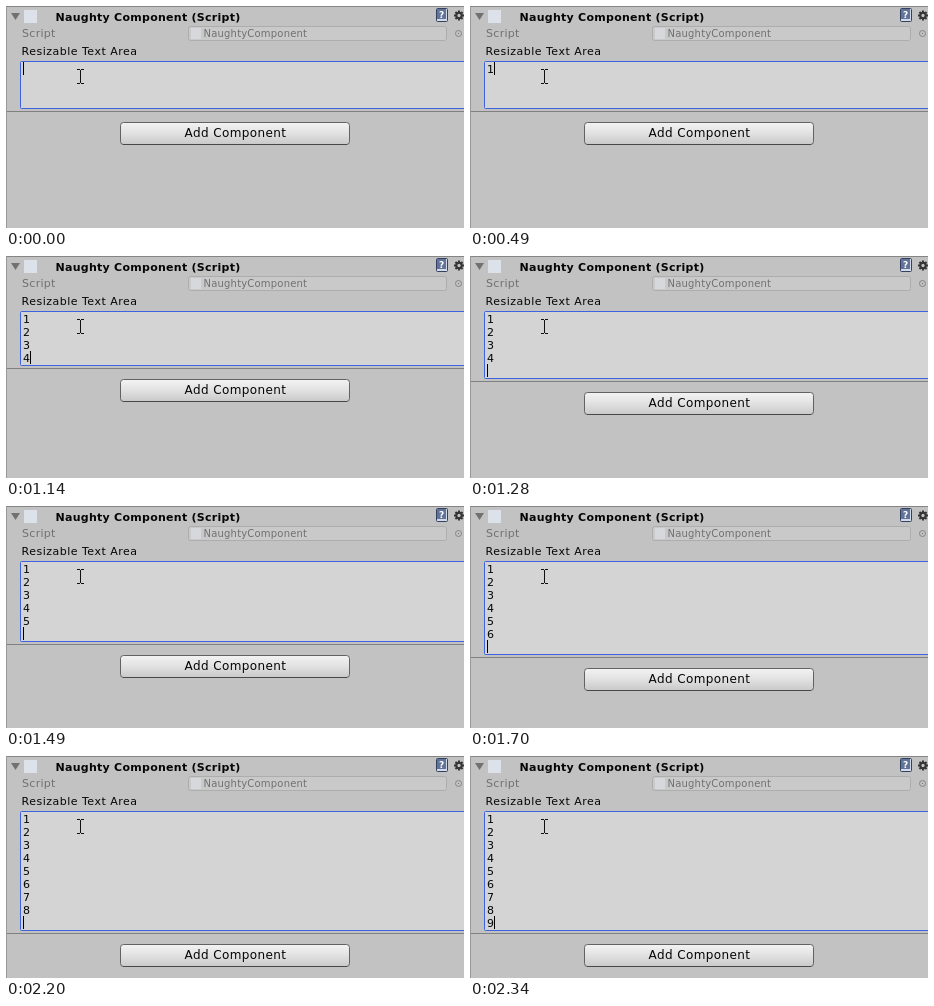
An HTML page with a canvas for the animation above (2520 ms loop, 458x222 px).

```html
<!DOCTYPE html>
<html lang="en">
<head>
<meta charset="utf-8">
<title>Resizable text area</title>
<style>
html, body { margin: 0; width: 100%; height: 100%; overflow: hidden; background: #c2c2c2; }
canvas { display: block; width: 458px; height: 222px; }
</style>
</head>
<body>
<canvas id="stage" width="458" height="222"></canvas>
<script>
const ctx = document.getElementById('stage').getContext('2d');
const W = 458, H = 222, LOOP = 2520;
const LINE = 13, AREA_TOP = 55, MIN_BOTTOM = 103;

// Each key press alternates between a digit and a line break.
const KEYS = [490, 590, 690, 790, 890, 1030, 1140, 1280, 1350,
              1490, 1560, 1700, 1810, 1950, 2060, 2200, 2340];

function rect(x, y, w, h, color) {
  ctx.fillStyle = color;
  ctx.fillRect(x, y, w, h);
}

function text(str, x, y, size, color, spacing = 0, weight = 'normal') {
  ctx.font = `${weight} ${size}px "DejaVu Sans", sans-serif`;
  ctx.letterSpacing = spacing + 'px';
  ctx.fillStyle = color;
  ctx.fillText(str, x, y);
}

function roundBox(x, y, w, h, r, fill, stroke) {
  ctx.beginPath();
  ctx.roundRect(x, y, w, h, r);
  ctx.fillStyle = fill;
  ctx.fill();
  ctx.strokeStyle = stroke;
  ctx.lineWidth = 1;
  ctx.stroke();
}

function ring(x, y, r, color, width) {
  ctx.beginPath();
  ctx.arc(x, y, r, 0, Math.PI * 2);
  ctx.strokeStyle = color;
  ctx.lineWidth = width;
  ctx.stroke();
}

function gear(x, y) {
  ctx.save();
  ctx.translate(x, y);
  for (let i = 0; i < 8; i++) {
    rect(-1, -5, 2, 3, '#363636');
    ctx.rotate(Math.PI / 4);
  }
  ring(0, 0, 2.7, '#363636', 2);
  ctx.restore();
}

function helpBook() {
  roundBox(430.5, 2.5, 11, 13, 1, '#d3dae8', '#33415f');
  rect(431, 3, 9, 10, '#627399');
  text('?', 433, 12, 9, '#ffffff', 0, 'bold');
}

function header() {
  rect(0, 0, W, 1, '#858585');
  rect(0, 0, 1, H, '#989898');
  ctx.beginPath();
  ctx.moveTo(5, 7);
  ctx.lineTo(14, 7);
  ctx.lineTo(9.5, 14);
  ctx.fillStyle = '#717171';
  ctx.fill();
  rect(18, 4, 13, 13, '#dce1ea');
  text('Naughty Component (Script)', 49.5, 15, 11, '#050505', 0.27, 'bold');
  helpBook();
  gear(453, 9.5);
}

function scriptField() {
  text('Script', 16, 31, 11, '#707070', 0.3);
  roundBox(182.5, 20.5, 258, 14, 2, '#c9c9c9', '#adadad');
  rect(185, 22, 10, 11, '#d6d8dc');
  text('NaughtyComponent', 197.5, 31, 10, '#707070', 0.2);
  ring(452.5, 27.5, 3, '#858585', 1);
  rect(452, 27, 1, 1, '#707070');
}

function textArea(count, bottom) {
  text('Resizable Text Area', 15.5, 49, 11, '#050505', 0.5);
  roundBox(14.5, AREA_TOP + 0.5, W, bottom - AREA_TOP - 1, 1, '#d4d4d4', '#3f62e0');
  const digits = Math.ceil(count / 2);
  for (let i = 0; i < digits; i++)
    text(String(i + 1), 17, 67 + i * LINE, 11, '#050505');
  const row = Math.floor(count / 2);
  rect(count % 2 ? 24 : 17, 56 + row * LINE, 1, 13, '#000000');
}

function button(y) {
  const g = ctx.createLinearGradient(0, y, 0, y + 22);
  g.addColorStop(0, '#f4f4f4');
  g.addColorStop(0.5, '#e2e2e2');
  g.addColorStop(1, '#cacaca');
  roundBox(114.5, y + 0.5, 229, 22, 3, g, '#626262');
  rect(117, y + 22, 224, 1, '#484848');
  text('Add Component', 178.5, y + 15, 12, '#050505', 0.4);
}

function pointer() {
  rect(74, 64, 1, 13, '#101010');
  for (const y of [63, 77]) {
    rect(71, y, 3, 1, '#101010');
    rect(75, y, 3, 1, '#101010');
  }
}

function draw(t) {
  const count = KEYS.filter(k => k <= t).length;
  const lines = Math.floor(count / 2) + 1;
  const bottom = Math.max(MIN_BOTTOM, 58 + lines * LINE);
  rect(0, 0, W, H, '#c2c2c2');
  header();
  scriptField();
  textArea(count, bottom);
  rect(1, bottom + 2, W - 1, 1, '#808080');
  button(bottom + 13);
  pointer();
}

const start = performance.now();
function tick() {
  draw((performance.now() - start) % LOOP);
  requestAnimationFrame(tick);
}
tick();
</script>
</body>
</html>
```
